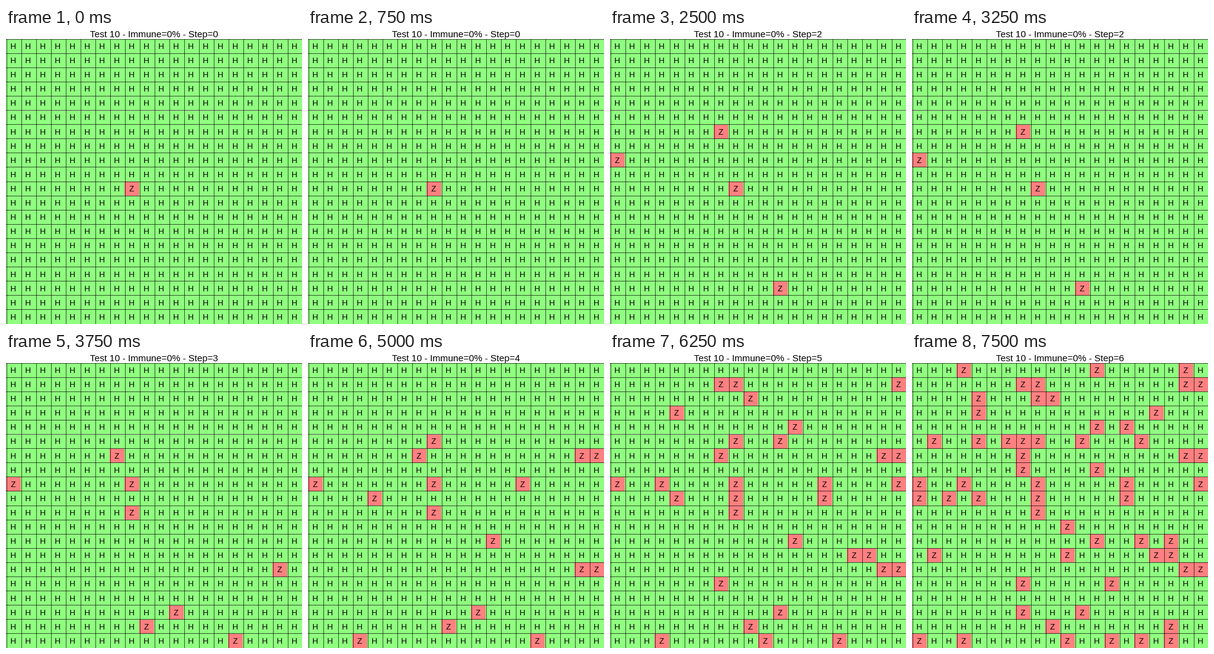
A matplotlib script for the animation above (8 s loop, 480 by 480 pixels).

```python
import matplotlib.pyplot as plt
from matplotlib.animation import FuncAnimation
from matplotlib.patches import Rectangle

SIZE = 480
GRID = 20
TOP = 18
CELL_W = SIZE / GRID
CELL_H = (SIZE - TOP) / GRID
HEALTHY, ZOMBIE = "#90ff80", "#ff8080"
TICK = 250
STEP_MS = 1250
FRAMES = 32

# New zombies at each step, as row: columns
OUTBREAK = [
    {10: [8]},
    {17: [11]},
    {6: [7], 8: [0]},
    {8: [8], 14: [18], 18: [9], 19: [15]},
    {5: [8], 6: [18, 19], 8: [14], 9: [4], 12: [12], 14: [19], 19: [3]},
    {1: [7, 8, 19], 2: [9], 3: [4], 4: [12], 5: [11], 8: [3, 19],
     9: [8, 14], 13: [16, 17], 15: [7], 19: [10]},
    {0: [3, 12, 18], 1: [18], 2: [4, 8], 3: [16], 4: [14],
     5: [1, 4, 6, 7, 15], 7: [7, 12], 9: [0, 2], 11: [10],
     12: [15, 17], 13: [1, 10], 15: [13], 17: [7], 18: [17],
     19: [0, 13, 17]},
]
infected_at = {(row, col): step
               for step, rows in enumerate(OUTBREAK)
               for row, cols in rows.items() for col in cols}

plt.rcParams["font.family"] = "Liberation Sans"
fig = plt.figure(figsize=(SIZE / 72, SIZE / 72), dpi=72, facecolor="white")
ax = fig.add_axes([0, 0, 1, 1])
ax.set_xlim(0, SIZE)
ax.set_ylim(SIZE, 0)
ax.axis("off")

title = ax.text(SIZE / 2, 15, "", fontsize=15, ha="center", va="baseline")
cells = {}
for row in range(GRID):
    for col in range(GRID):
        x, y = col * CELL_W, TOP + row * CELL_H
        box = ax.add_patch(Rectangle((x, y), CELL_W, CELL_H, fc=HEALTHY,
                                     ec="none", antialiased=False))
        label = ax.text(x + CELL_W / 2, round(y + CELL_H / 2 + 4.4), "H",
                        fontsize=13, ha="center", va="baseline")
        cells[row, col] = box, label

line = dict(color="black", lw=1, alpha=0.65, snap=True, zorder=2)
for i in range(GRID + 1):
    x, y = i * CELL_W + 0.5, TOP + i * CELL_H - 0.5
    ax.plot([min(x, SIZE - 0.5)] * 2, [TOP - 0.5, SIZE], **line)
    ax.plot([0, SIZE], [y, y], **line)


def update(frame):
    step = frame * TICK // STEP_MS
    title.set_text(f"Test 10 - Immune=0% - Step={step}")
    for key, start in infected_at.items():
        box, label = cells[key]
        sick = start <= step
        box.set_facecolor(ZOMBIE if sick else HEALTHY)
        label.set_text("Z" if sick else "H")
    return [title]


anim = FuncAnimation(fig, update, frames=FRAMES, interval=TICK, repeat=True,
                     repeat_delay=0, blit=False)
plt.show()
```
